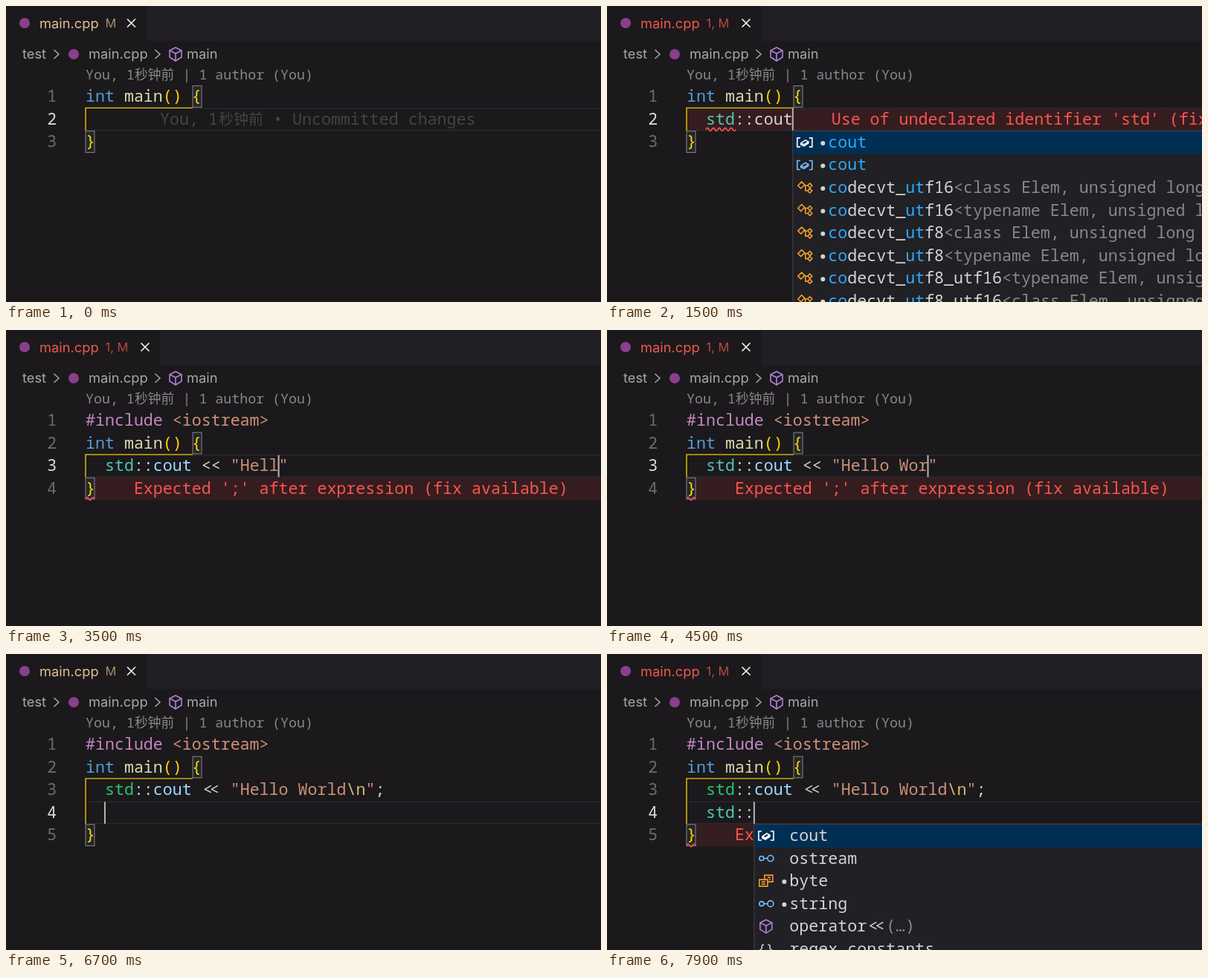
These frames come from a looping animation (800 px wide and 399 px high, 8 s). An HTML page:

```html
<!DOCTYPE html>
<html lang="en">
<head>
<meta charset="utf-8">
<title>Typing in an editor</title>
<style>
html, body { margin: 0; width: 100%; height: 100%; overflow: hidden; background: #1b191c; }
svg { display: block; width: 800px; height: 399px; }
text { white-space: pre; }
.mono { font-family: 'Noto Sans Mono', 'Noto Sans CJK SC', monospace; }
.ui { font-family: Inter, 'Liberation Sans', sans-serif; }
</style>
</head>
<body>
<svg id="stage" viewBox="0 0 800 399"></svg>
<script>
(() => {
const stage = document.getElementById('stage');
const LEFT = 107, CHAR = 12.98, SIZE = 21.63, ROW = 30.55, LOOP = 8000;
const INDENT = LEFT + 2 * CHAR;
const C = {
  fg: '#d4d4d4', dim: '#89878a', blue: '#569cd6', fn: '#dcdcaa', gold: '#ffd700',
  teal: '#4ec9b0', green: '#25c771', pale: '#9cdcfe', str: '#ce9178', esc: '#d7ba6d',
  pink: '#c586c0', red: '#fb5450', match: '#2aaaff', orange: '#ee9d28',
  sky: '#75beff', purple: '#b180d7', file: '#8a3f8c'
};

// Keystrokes and the moments they land
const FIRST = 'std::cout << "Hello World\\n";';
const FIRST_AT = [100, 200, 300, 900, 1000, 1200, 1300, 1400, 1500, 1900, 2000, 2100, 2300, 2400,
  2700, 2900, 3100, 3300, 3600, 3800, 4000, 4200, 4400, 4700, 4900, 5500, 6000, 6100, 6200];
const SECOND = 'std::';
const SECOND_AT = [7200, 7300, 7500, 7700, 7800];
const INCLUDE = 1700, NEWLINE = 6500;
const KEYS = [...FIRST_AT, INCLUDE, NEWLINE, ...SECOND_AT].sort((a, b) => a - b);

const STD = [
  ['ns', 'std'], ['abc', '__STDC__'], ['abc', '__STDC_HOSTED__'], ['abc', '__STDC_UTF_16__'],
  ['abc', '__STDC_UTF_32__'], ['abc', '__STDC_VERSION__'],
  ['abc', '__STDCPP_THREADS__'], ['abc', '__STDC_ISO_10646__']
];
const MEMBERS = [
  ['var', 'cout'], ['face', 'ostream'], ['enum', 'byte', '', 1], ['face', 'string', '', 1],
  ['cube', 'operator<<', '(…)'], ['ns', 'regex_constants'], ['face', 'istream'], ['var', 'cin']
];
const codecvt = (end, kind) => ['cls', 'codecvt_' + end, `<${kind} Elem, unsigned long Maxcode>`, 1];
const COUT = [
  ['var', 'cout', '', 1], ['var', 'cout', '', 1],
  codecvt('utf16', 'class'), codecvt('utf16', 'typename'),
  codecvt('utf8', 'class'), codecvt('utf8', 'typename'),
  codecvt('utf8_utf16', 'typename'), codecvt('utf8_utf16', 'class')
];

const ICONS = {
  var: [C.sky, '<path d="M-6-6h-4v12h4M6-6h4v12h-4M-5 1l6-4 4 2v2l-6 4-4-2zl4 2 6-4"/>'],
  cls: [C.orange, '<path d="M-9-3l5-5 4 4-5 5zM-2-3h6M1-3v7h3M4-3l3-3 3 3-3 3zM4 4l3-3 3 3-3 3z"/>'],
  face: [C.sky, '<circle cx="-6" r="3"/><circle cx="6" r="4"/><path d="M-3 0h5"/>'],
  enum: [C.orange, '<path d="M-2-2v-6H9v9H2M-9-2H2v9H-9zM-6 1h5M-6 4h5M2-5h4M4-2h2"/>'],
  cube: [C.purple, '<path d="M0-9l8 4v9l-8 5-8-5v-9zM-8-5l8 4 8-4M0-1v10"/>']
};

const esc = s => s.replace(/&/g, '&amp;').replace(/</g, '&lt;');
const rowTop = n => 106.8 + ROW * (n - 1);
const count = (times, t) => times.filter(k => k <= t).length;
const rect = (x, y, w, h, fill, more = '') => `<rect x="${x}" y="${y}" width="${w}" height="${h}" fill="${fill}" ${more}/>`;
const line = (d, color, w = 1.5) => `<path d="${d}" fill="none" stroke="${color}" stroke-width="${w}"/>`;

// A span is [text, colour, dx, letter spacing]
function text(x, y, spans, size = SIZE, cls = 'mono', more = '') {
  const body = spans.map(([s, color, dx = 0, gap = 0]) =>
    `<tspan fill="${color}" dx="${dx}" letter-spacing="${gap}">${esc(s)}</tspan>`).join('');
  return `<text class="${cls}" x="${x}" y="${y}" font-size="${size}" ${more}>${body}</text>`;
}
const code = (n, x, spans, more) => text(x, rowTop(n) + 22.3, spans, SIZE, 'mono', more);
const ui = (x, y, s, color, size = 18.3) => text(x, y, [[s, color]], size, 'ui');

function squiggle(x, end, n, color) {
  let d = `M${x} ${rowTop(n) + 29}q2-4 4 0`;
  for (let p = x + 4; p < end - 2; p += 4) d += 't4 0';
  return line(d, color, 1.6);
}

function icon(kind, x, y, color) {
  if (kind === 'ns') return text(x - 11, y + 6, [['{}', C.fg]], 18);
  if (kind === 'abc') return text(x - 11, y + 5, [['abc', C.fg]], 13);
  const [base, shape] = ICONS[kind];
  return `<g transform="translate(${x} ${y})" fill="none" stroke="${color || base}" stroke-width="1.6">${shape}</g>`;
}

function header(bad) {
  const w = bad ? 207.5 : 189.5, x = bad ? 187 : 168.5;
  const dot = (cx, cy) => `<circle cx="${cx}" cy="${cy}" r="7" fill="${C.file}"/>`;
  return rect(w, 0, 800 - w, 47.5, '#211f23') + dot(25, 23) +
    ui(45, 29.5, 'main.cpp', bad ? '#f0594c' : '#e2c08d') +
    ui(133.5, 29, bad ? '1, M' : 'M', bad ? '#b94a42' : '#a58c68', 16.4) +
    line(`M${x - 5.5} 17.5l11 11m0-11l-11 11`, '#f0f0f0', 1.7) +
    ui(22, 71, 'test', '#a9a7aa') + line('M64.5 59l6.5 6-6.5 6M200.5 59l6.5 6-6.5 6', '#a9a7aa') +
    dot(91, 65) + ui(111, 71, 'main.cpp', '#a9a7aa') +
    icon('cube', 228, 65) + ui(243, 71, 'main', '#a9a7aa') +
    text(LEFT, 99, [['You, 1', C.dim]], 18.3) +
    text(173, 99, [['秒钟前', C.dim]], 17.7) +
    text(226.5, 99, [[' | 1 author (You)', C.dim]], 18.3);
}

function statement(typed, t, second) {
  const parts = typed.match(/std|::|cout|<<|\\n?|"|\s+|[^\\"\s:<]+|./g) || [];
  const ligature = t >= 6200;
  let quoted = false, after = 0;
  return parts.map(p => {
    const dx = after;
    after = 0;
    if (p === '"') { quoted = !quoted; return [p, C.str, dx]; }
    if (quoted) return [p, p[0] === '\\' ? C.esc : C.str, dx];
    if (p === 'std') return [p, t >= 5300 && !second ? C.green : C.teal, dx];
    if (p === 'cout') return [p, t >= 2700 ? C.pale : C.fg, dx];
    if (p === '<<' && ligature) { after = 6; return [p, C.fg, 2, -4]; }
    return [p, C.fg, dx];
  });
}

function matched(s, query) {
  let k = 0;
  return [...s].map(c => k < query.length && c.toLowerCase() === query[k] ? (k++, [c, C.match]) : [c, C.fg]);
}

function popup(x, n, items, query) {
  const y = rowTop(n + 1) + .7;
  let out = rect(x, y, 820, 260, '#212024', 'stroke="#454347"') + rect(x + 1, y + .5, 800, ROW, '#002f54');
  items.forEach(([kind, name, tail = '', dot], i) => {
    const mid = y + ROW * (i + .5);
    const spans = name.endsWith('<<')
      ? [[name.slice(0, -2), C.fg], ['<<', C.fg, 2, -4], [tail, C.dim, 6]]
      : [...matched(name, query), [tail, C.dim]];
    out += icon(kind, x + 16, mid, i ? '' : '#fff') + text(x + 47.5, mid + 7, spans);
    if (dot) out += `<circle cx="${x + 40.5}" cy="${mid + 1}" r="3" fill="${C.fg}"/>`;
  });
  return out;
}

function scene(t) {
  let typed = FIRST.slice(0, count(FIRST_AT, t));
  const more = SECOND.slice(0, count(SECOND_AT, t));
  const col = t >= NEWLINE ? more.length : typed.length;
  if (t >= 2400 && t < 6100) typed += '"';

  const open = t >= INCLUDE ? 2 : 1;
  const row = t >= NEWLINE ? 4 : open + 1;
  const close = row + 1;
  const cursor = INDENT + col * CHAR;
  const undeclared = t >= 500 && t < INCLUDE;
  const expected = t >= 1900 && t < 6300;
  const unfinished = t >= 7600;
  const bad = t >= 500 && t < 6400 || unfinished;
  const broken = t >= 5700 && t < 6100;

  let out = header(bad);

  // Row backgrounds and the active bracket pair
  const y = rowTop(row);
  if (undeclared) out += rect(LEFT, y, 693, ROW, '#351d1f');
  if (expected || unfinished) out += rect(LEFT, rowTop(close), 693, ROW, '#351d1f');
  out += line(`M${LEFT} ${y + .7}H800M${LEFT} ${y + ROW - .4}H800`, '#2d2b2e', 1.3);
  if (broken) out += line(`M${LEFT} ${y}v${ROW}`, '#6a686b', 1.2);
  else {
    const box = (x, n) => rect(x, rowTop(n) + .8, 12, ROW - 1.8, '#24272a', 'stroke="#85858a"');
    out += line(`M251 ${rowTop(open + 1)}H${LEFT}V${rowTop(close)}`, '#e9c400', 1.4) + box(251, open) + box(LEFT, close);
  }

  for (let n = 1; n <= close; n++)
    out += code(n, 55.2, [[String(n), n === row ? '#dcdcdc' : '#6e6c6f']]);

  // Code
  if (open === 2) {
    out += code(1, LEFT, [['#include', C.pink], [' <iostream>', C.str]], broken ? 'opacity=".62"' : '');
    if (broken) out += squiggle(LEFT, 354, 1, '#b5a11e');
  }
  out += code(open, LEFT, [['int', C.blue], [' main', C.fn], ['()', C.gold], [' {', broken ? '#e0483c' : C.gold]]);
  out += code(open + 1, INDENT, statement(typed, t));
  if (more) out += code(4, INDENT, statement(more, t, true));
  out += code(close, LEFT, [['}', broken ? C.str : C.gold]]);

  // Inline notes
  if (t < 100) {
    const grey = '#454346';
    out += code(2, 207, [['You, 1', grey]]) + text(286, rowTop(2) + 22.3, [['秒钟前', grey]], 20) +
      code(2, 359, [['• Uncommitted changes', grey]]);
  }
  if (undeclared)
    out += squiggle(INDENT, 172, 2, C.red) +
      code(2, cursor + 4 * CHAR, [["Use of undeclared identifier 'std' (fix available)", C.red]]);
  if (expected)
    out += code(close, LEFT + 5 * CHAR, [["Expected ';' after expression (fix available)", C.red]]);
  if (unfinished)
    out += code(close, LEFT + 5 * CHAR, [['Expected unqualified-id', C.red]]);
  if (expected && !broken || unfinished) out += squiggle(LEFT, 119, close, C.red);
  if (broken) out += squiggle(302, 485, 3, C.red);

  // Suggestions
  if (t >= 400 && t < 900) out += popup(cursor, 2, STD, 'std');
  if (t >= 1100 && t < 1600) out += popup(cursor, 2, t < 1200 ? MEMBERS : COUT, typed.slice(5));
  if (t >= 7500 && t < 7700) out += popup(cursor, 4, STD, 'std');
  if (t >= 7900) out += popup(cursor, 4, MEMBERS, '');

  // Caret: solid after a key, then blinking
  const idle = t - (KEYS[count(KEYS, t) - 1] ?? -600);
  if (idle % 1200 < 600) out += rect(cursor - 1, y + .8, 2, ROW - 1, '#b4b4b4');
  return out;
}

let shown = -1;
function tick() {
  const t = Math.floor(performance.now() % LOOP / 100) * 100;
  if (t !== shown) stage.innerHTML = scene(shown = t);
  requestAnimationFrame(tick);
}
tick();
})();
</script>
</body>
</html>
```
